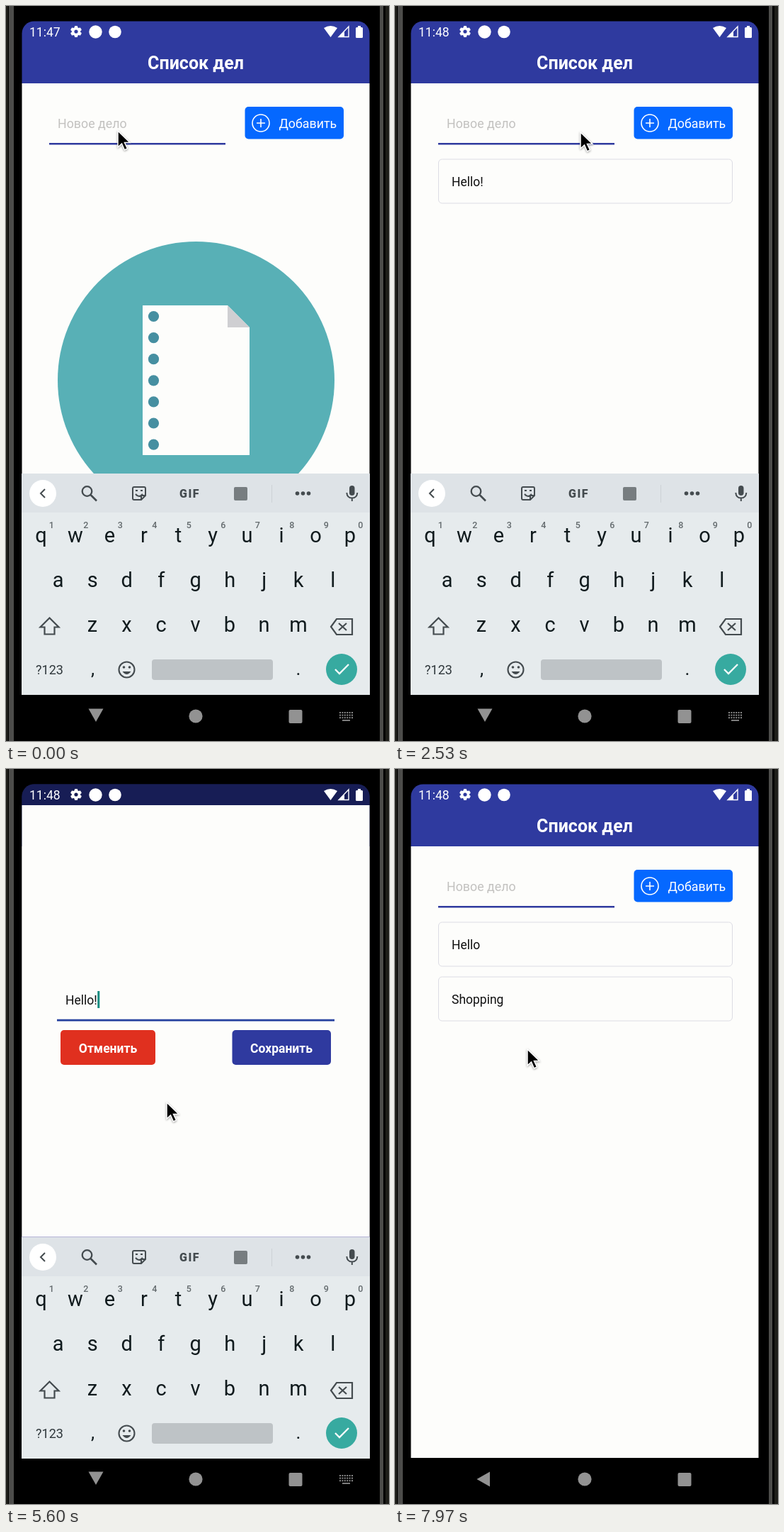
An HTML page with a canvas for the animation above (8 s loop, 541 by 1036 pixels).

```html
<!DOCTYPE html>
<html lang="ru">
<head>
<meta charset="utf-8">
<style>
html, body { margin: 0; width: 100%; height: 100%; overflow: hidden; background: #000; }
canvas { display: block; }
</style>
</head>
<body>
<canvas id="stage" width="541" height="1036"></canvas>
<script>
const ctx = document.getElementById('stage').getContext('2d');
const LOOP = 8000;
const INDIGO = '#2f3a9f', PAPER = '#fdfdfb', RED = '#e0301f', GREY = '#444b4f';

const clamp = v => Math.max(0, Math.min(1, v));
const ramp = (t, start, length) => clamp((t - start) / length);
const smooth = p => p * p * (3 - 2 * p);

// Pointer stops: time, x, y
const POINTER = [
  [0, 158, 176], [150, 158, 176], [500, 400, 165], [750, 400, 165], [1400, 266, 183],
  [1980, 266, 183], [2170, 395, 172], [2230, 395, 172], [2360, 262, 178], [3350, 262, 178],
  [3650, 393, 177], [3900, 393, 177], [4350, 250, 245], [4550, 250, 245], [4850, 407, 196],
  [5050, 407, 196], [5500, 227, 470], [5850, 227, 470], [6250, 390, 395], [6420, 390, 395],
  [6700, 404, 185], [6850, 404, 185], [7200, 160, 285], [7400, 160, 285], [7800, 187, 395]
];
// Keyboard toggles, alternately closing and opening
const TOGGLES = [600, 1651, 2200, 2360, 3721, 5250, 6400];
const SLIDE = 140;

function box(x, y, w, h, r, fill, stroke, line = 1) {
  ctx.beginPath();
  ctx.roundRect(x, y, w, h, r);
  paint(fill, stroke, line);
}

function disc(x, y, r, fill, stroke, line = 1) {
  ctx.beginPath();
  ctx.arc(x, y, r, 0, 7);
  paint(fill, stroke, line);
}

function paint(fill, stroke, line) {
  if (fill) { ctx.fillStyle = fill; ctx.fill(); }
  if (stroke) { ctx.strokeStyle = stroke; ctx.lineWidth = line; ctx.stroke(); }
}

function shape(d, x, y, fill, stroke, line = 2) {
  const p = new Path2D(d);
  ctx.save();
  ctx.translate(x, y);
  if (fill) { ctx.fillStyle = fill; ctx.fill(p); }
  if (stroke) { ctx.strokeStyle = stroke; ctx.lineWidth = line; ctx.stroke(p); }
  ctx.restore();
}

function text(s, x, y, size, color, align = 'left', weight = 400) {
  ctx.font = `${weight} ${size}px Roboto, sans-serif`;
  ctx.textAlign = align;
  ctx.fillStyle = color;
  ctx.fillText(s, x, y);
}

function faded(alpha, draw) {
  ctx.save();
  ctx.globalAlpha *= alpha;
  draw();
  ctx.restore();
}

function typed(word, t, start, end) {
  return word.slice(0, Math.ceil(word.length * ramp(t, start, end - start)));
}

function field(value, x, y, blink) {
  text(value, x, y, 17.5, '#111');
  if (blink) {
    ctx.fillStyle = '#128c80';
    ctx.fillRect(x + ctx.measureText(value).width + 0.5, y - 19, 3, 24);
  }
}

function header() {
  ctx.fillStyle = INDIGO;
  ctx.fillRect(22, 21, 492, 88);
  text('Список дел', 268, 89, 25, '#fff', 'center', 700);
}

function statusBar(t) {
  text(t < 1250 ? '11:47' : '11:48', 33, 43, 17.5, '#fff');
  for (let i = 0; i < 6; i++) {
    ctx.save();
    ctx.translate(99, 36);
    ctx.rotate(i * Math.PI / 3);
    box(-2.2, -8, 4.4, 5, 1, '#fff');
    ctx.restore();
  }
  disc(99, 36, 4.4, null, '#fff', 3.6);
  disc(126.5, 36.5, 9.2, '#fff');
  disc(154, 36.5, 8.8, '#fff');
  shape('M449 31Q458.500 25 468 31L458.500 44Z', 0, 0, '#fff');
  shape('M484 29V43.500H470Z', 0, 0, null, '#fff', 1.4);
  shape('M478 35V43H471Z', 0, 0, '#fff');
  box(494, 30, 10, 15, 1.5, '#fff');
  ctx.fillRect(497, 28, 4, 3);
}

function illustration() {
  disc(268.5, 527.5, 195.5, '#58b0b6');
  shape('M193 422H313L344 453V633H193Z', 0, 0, PAPER);
  shape('M313 422L344 453H313Z', 0, 0, '#cfcfd2');
  for (let i = 0; i < 7; i++) disc(208.5, 437.5 + 30.1 * i, 7.6, '#468fa1');
}

function home(t) {
  ctx.fillStyle = PAPER;
  ctx.fillRect(22, 109, 492, 862);
  let value = '';
  if (t > 1800 && t < 2200) value = typed('Hello!', t, 1800, 2060);
  if (t > 2600 && t < 3725) value = typed('Shopping', t, 2600, 3250);
  if (value) field(value, 73, 172, t % 400 < 200);
  else text('Новое дело', 73, 172, 17.8, '#c3c2c0');
  ctx.fillStyle = INDIGO;
  ctx.fillRect(61, 193, 249, 2.5);

  box(337.5, 142, 139.5, 45.5, 5, '#0568ff');
  disc(360, 165, 12, null, '#fff', 1.6);
  shape('M-6 0H6M0 -6V6', 360, 165, null, '#fff', 1.6);
  text('Добавить', 385.5, 172, 17.8, '#fff');

  const items = [];
  if (t >= 2220) items.push(t < 6400 ? 'Hello!' : 'Hello');
  if (t >= 3820) items.push('Shopping');
  if (!items.length) illustration();
  items.forEach((item, i) => {
    const y = 216 + 77 * i;
    box(61.5, y, 415, 62, 5, null, '#dcdce4');
    text(item, 80, y + 37.5, 17.5, '#111');
  });
}

function detail(t) {
  ctx.fillStyle = PAPER;
  ctx.fillRect(22, 109, 492, 862);
  ctx.save();
  ctx.shadowColor = 'rgba(60,60,100,.3)';
  ctx.shadowBlur = 11;
  ctx.shadowOffsetY = 2;
  box(60.5, 134, 416, 100.5, 11, PAPER);
  ctx.restore();
  text(t < 6400 ? 'Hello!' : 'Hello', 85, 194.5, 25, '#000', 'left', 700);

  faded(t > 4880 && t < 5100 ? 0.72 : 1, () => {
    box(376, 159, 75.5, 50, 5, INDIGO);
    shape('M7 -9H-8Q-11 -9 -11 -6V6Q-11 9 -8 9H5Q8 9 8 6V3', 413, 184, null, '#fff', 1.8);
    shape('M-4 1L8 -10L13 -5L1 6L-5 7Z', 413, 184, '#fff');
    shape('M-2 2L1 5M6 -8L10 -4', 413, 184, null, INDIGO, 1);
  });
  box(60.5, 260, 190.5, 50, 5, '#666664');
  shape('M-3 -7L-9 -2L-3 3M-9 -2H1Q9 -1 9 8', 156, 286, null, '#fff', 1.8);
  box(285, 260, 191.5, 50, 5, RED);
  shape('M-6.500 -6.500L6.500 6.500M6.500 -6.500L-6.500 6.500', 380.5, 286, null, '#fff', 4.6);
}

function editor(t, opened) {
  ctx.fillStyle = PAPER;
  ctx.fillRect(22, 51, 492, 920);
  ctx.save();
  ctx.translate(0, 156 * (1 - opened));
  field(t < 5950 ? 'Hello!' : 'Hello', 84, 332, t % 800 < 400 || t < 5250);
  ctx.fillStyle = '#25409f';
  ctx.fillRect(72, 352.7, 392, 2.8);
  box(77, 368, 134, 49, 5, RED);
  text('Отменить', 144, 400, 17.5, '#fff', 'center', 700);
  box(319.5, 368, 139.5, 49, 5, INDIGO);
  text('Сохранить', 389, 400, 17.5, '#fff', 'center', 700);
  ctx.restore();
}

function toolbar() {
  disc(52, 687, 19, '#fff');
  shape('M3 -6L-3 0L3 6', 52, 687, null, GREY);
  disc(114.5, 684, 6.8, null, GREY, 2.3);
  shape('M4.500 5L13 13.500', 115, 684, null, GREY, 2.6);
  shape('M-9 -7Q-9 -9 -7 -9H7Q9 -9 9 -7V3L3 9H-7Q-9 9 -9 7ZM9 3H3V9M-5 1Q0 7 5 1M-5 -4H-2M2 -4H5', 188, 687, null, GREY);
  ctx.letterSpacing = '1.5px';
  text('GIF', 259.5, 692.5, 16, GREY, 'center', 900);
  ctx.letterSpacing = '0px';
  box(322, 678, 19, 19, 2, '#777d80');
  ctx.fillStyle = '#cdd2d6';
  ctx.fillRect(375, 675, 1, 25);
  for (let i = -1; i < 2; i++) disc(419.5 + 8 * i, 687, 2.8, GREY);
}

function suggestions() {
  disc(52, 687, 19, '#fff');
  shape('M-3 -6L3 0L-3 6', 52, 687, null, GREY);
  ['Shopping', 'Stopping', 'Shoppings'].forEach((word, i) =>
    text(word, 132 + 134.5 * i, 695, 22.7, '#4c5458', 'center'));
  ctx.fillStyle = '#cdd2d6';
  ctx.fillRect(196, 672, 1, 30);
  ctx.fillRect(338, 672, 1, 30);
}

function keyboard(t) {
  ctx.fillStyle = '#e6ebed';
  ctx.fillRect(22, 659, 492, 312);
  ctx.fillStyle = '#dee3e7';
  ctx.fillRect(22, 659, 492, 55);
  (t > 2640 && t < 4000 ? suggestions : toolbar)();
  box(485, 676, 7.5, 14, 4, GREY);
  shape('M-7.500 -1Q-7 6.500 0 6.500Q7 6.500 7.500 -1M0 6.500V11', 488.8, 687, null, GREY);

  const ink = '#101a1d';
  [['qwertyuiop', 49.5], ['asdfghjkl', 73.7], ['zxcvbnm', 122]].forEach(([row, x], r) =>
    [...row].forEach((key, i) => {
      text(key, x + 48.5 * i, 756 + 62.8 * r, 29, ink, 'center');
      if (!r) text((i + 1) % 10, x + 14.8 + 48.5 * i, 736, 12.5, '#636a6d', 'center', 500);
    }));
  shape('M0 -12L13 1H7V11H-7V1H-13Z', 61.5, 874.5, null, GREY, 2.2);
  shape('M-15 0L-7 -11H15V11H-7ZM-4 -5L7 5M7 -5L-4 5', 474, 875, null, GREY, 2.2);
  text('?123', 61.5, 942, 18, '#30383c', 'center');
  text(',', 122.5, 943, 26, ink, 'center');
  text('.', 413, 943, 26, ink, 'center');
  disc(170.5, 935.5, 11, null, GREY, 2.1);
  disc(166.5, 932, 1.8, GREY);
  disc(174.5, 932, 1.8, GREY);
  shape('M-6 2Q0 10 6 2Z', 170.5, 936, GREY);
  box(206, 921, 171, 29, 4, '#bec3c6');
  disc(474, 935, 22, '#37aaa0');
  shape('M-9 0L-3 6L10 -7', 474, 935, null, '#fff', 2.3);
}

function drawKeyboard(t, hidden, opening) {
  if (hidden >= 1) return;
  const drop = Math.round(72 * hidden) + (t > 5200 ? 1 : 0);
  ctx.save();
  ctx.beginPath();
  ctx.rect(22, 0, 492, 971 + drop);
  ctx.clip();
  faded((1 - hidden) ** 0.8, () => {
    ctx.translate(0, drop);
    keyboard(t);
    if (t > 5200) { ctx.fillStyle = '#b5b4d6'; ctx.fillRect(22, 658, 492, 1); }
  });
  if (opening) {
    ctx.fillStyle = 'rgba(0,0,0,.4)';
    ctx.fillRect(22, 971, 492, 80);
  }
  ctx.restore();
}

function navigation(hidden, opening) {
  const turn = clamp(opening ? (1 - hidden) * 1.75 : 1 - hidden * 3);
  const grey = '#929292';
  ctx.save();
  ctx.translate(126.5 + 0.5 * turn, 1001 - 3 * turn);
  ctx.rotate(-turn * Math.PI / 2);
  shape('M-11 0L7.500 -10.500V10.500Z', 0, 0, grey);
  ctx.restore();
  disc(268, 1001, 9.6, grey);
  box(399.5, 992, 19, 19, 2, grey);
  if (hidden > 0) return;
  ctx.fillStyle = '#8a8a8a';
  for (let r = 0; r < 3; r++)
    for (let c = 0; c < 6; c++) ctx.fillRect(471 + 3.4 * c, 995 + 3.6 * r, 2, 2);
  ctx.fillRect(475, 1006, 11, 1.8);
}

function phone() {
  ctx.fillStyle = '#000';
  ctx.fillRect(0, 0, 541, 1036);
  [[0, 3, '#1e1e1a'], [4, 7, '#4c4c4a'], [528, 5, '#4c4c4a'], [536, 5, '#1e1e1a']].forEach(([x, w, color]) => {
    ctx.fillStyle = color;
    ctx.fillRect(x, 0, w, 1036);
  });
}

function pointer(t) {
  const i = POINTER.findLastIndex(stop => stop[0] <= t);
  const a = POINTER[i], b = POINTER[i + 1] || a;
  const p = a === b ? 0 : smooth(ramp(t, a[0], b[0] - a[0]));
  ctx.save();
  ctx.shadowColor = 'rgba(0,0,0,.3)';
  ctx.shadowBlur = 3;
  ctx.shadowOffsetY = 1;
  shape('M0 0V23L5.500 18L9.500 27L13.500 25L9.500 16.500H17Z',
    a[1] + (b[1] - a[1]) * p, a[2] + (b[2] - a[2]) * p, '#000', '#fff', 1.5);
  ctx.restore();
}

function draw(t) {
  const last = TOGGLES.findLastIndex(start => start <= t);
  const opening = last % 2 !== 0;
  const moved = last < 0 ? 1 : ramp(t, TOGGLES[last], SLIDE);
  const hidden = opening ? 1 - moved : moved;
  const detailAlpha = ramp(t, 4430, 100) * (1 - ramp(t, 7250, 100));
  const dim = 0.5 * ramp(t, 4910, 140) * (1 - ramp(t, 6440, 140));
  const raise = smooth(ramp(t, 4940, 200)) * (1 - smooth(ramp(t, 6420, 180)));

  phone();
  ctx.save();
  ctx.beginPath();
  ctx.roundRect(22.5, 21.5, 491, 949.5, [17, 17, 0, 0]);
  ctx.clip();
  header();
  if (detailAlpha < 1) home(t);
  if (detailAlpha > 0) faded(detailAlpha, () => detail(t));
  if (dim > 0) {
    ctx.fillStyle = `rgba(0,0,12,${dim})`;
    ctx.fillRect(22, 21, 492, 950);
  }
  if (raise > 0) {
    ctx.save();
    ctx.translate(0, 920 * (1 - raise));
    editor(t, t > 5000 ? 1 - hidden : 0);
    ctx.restore();
  }
  statusBar(t);
  ctx.restore();
  drawKeyboard(t, hidden, opening && hidden > 0);
  navigation(hidden, opening);
  pointer(t);
}

function tick() {
  draw(performance.now() % LOOP);
  requestAnimationFrame(tick);
}
tick();
</script>
</body>
</html>
```
